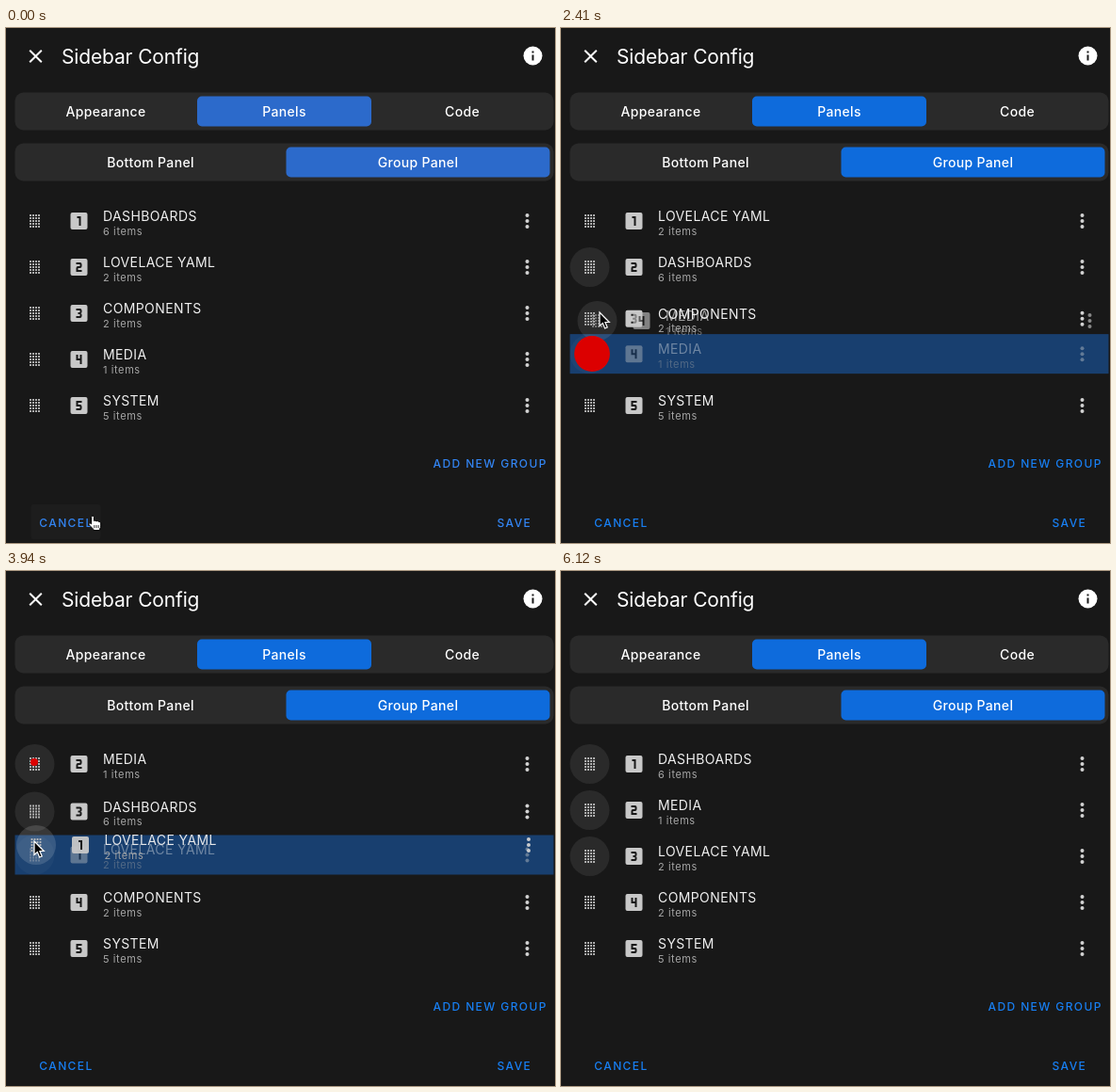
Animation, 583 px wide and 547 px high, one loop 7.65 s. Source, as an HTML page:

```html
<!DOCTYPE html>
<html lang="en">
<head>
<meta charset="utf-8">
<title>Sidebar Config</title>
<style>
  html, body { margin: 0; height: 100%; overflow: hidden; background: #181818; }
  svg { display: block; width: 583px; height: 547px; font-family: Inter, "Open Sans", sans-serif; --fill: #0e6bdc; --link: #187ff2; }
  svg.first { --fill: #2c6acb; --link: #3385f3; }
  .title { font-size: 21px; letter-spacing: -.15px; fill: #fff; }
  .tab { font-size: 14px; font-weight: 500; letter-spacing: .33px; text-anchor: middle; fill: #fff; }
  .link { font-size: 12px; font-weight: 500; letter-spacing: 1.4px; fill: var(--link); }
  .name { font-size: 14px; letter-spacing: .4px; fill: #f0f0f0; }
  .count { font-size: 11px; letter-spacing: .6px; fill: #a6a6a6; }
  .bar { fill: #2a2a2a; }
  .on { fill: var(--fill); }
</style>
</head>
<body>
<svg id="stage" viewBox="0 0 583 547">
  <rect width="583" height="547" fill="#181818"/>
  <path transform="translate(19.5 18)" fill="#fff" d="M19 6.41 17.59 5 12 10.59 6.41 5 5 6.41 10.59 12 5 17.59 6.41 19 12 13.41 17.59 19 19 17.59 13.41 12z"/>
  <text class="title" x="59" y="38">Sidebar Config</text>
  <circle cx="559.5" cy="29.5" r="10" fill="#fff"/>
  <path transform="translate(547.5 17.5)" fill="#181818" d="M13 9h-2V7h2zM13 17h-2v-6h2z"/>
  <rect class="bar" x="9.5" y="68.5" width="572" height="40" rx="9"/>
  <rect class="on" x="203" y="72.5" width="185" height="32" rx="5"/>
  <text class="tab" x="106" y="94">Appearance</text>
  <text class="tab" x="295.5" y="94">Panels</text>
  <text class="tab" x="484.5" y="94">Code</text>
  <rect class="bar" x="9.5" y="122.5" width="572" height="40" rx="9"/>
  <rect class="on" x="297.5" y="126.5" width="280" height="32" rx="5"/>
  <text class="tab" x="153.5" y="148">Bottom Panel</text>
  <text class="tab" x="437.5" y="148">Group Panel</text>
  <rect id="hover" x="26.5" y="506" width="74" height="37" rx="3" fill="#1d1d1d"/>
  <text class="link" x="453.5" y="466.5">ADD NEW GROUP</text>
  <text class="link" x="35.3" y="529.5">CANCEL</text>
  <text class="link" x="521.5" y="529.5">SAVE</text>
  <g id="live"></g>
</svg>
<script>
const LOOP = 7650, FPS = 17, SWAP = 150, SHRINK = 600;
const stage = document.getElementById('stage');
const hover = document.getElementById('hover');
const live = document.getElementById('live');

const items = [['DASHBOARDS', 6], ['LOVELACE YAML', 2], ['COMPONENTS', 2], ['MEDIA', 1], ['SYSTEM', 5]];
const digits = [
  'M14 17h-2V9h-2V7h4z',
  'M15 11a2 2 0 0 1-2 2h-2v2h4v2H9v-4a2 2 0 0 1 2-2h2V9H9V7h4a2 2 0 0 1 2 2z',
  'M15 10.5a1.5 1.5 0 0 1-1.5 1.5 1.5 1.5 0 0 1 1.5 1.5V15a2 2 0 0 1-2 2H9v-2h4v-2h-2v-2h2V9H9V7h4a2 2 0 0 1 2 2z',
  'M15 17h-2v-4H9V7h2v4h2V7h2z',
  'M15 9h-4v2h2a2 2 0 0 1 2 2v2a2 2 0 0 1-2 2H9v-2h4v-2H9V7h6z'
];

// Each drag: item, press and drop times, press point, grab point, direction, swap times
const drags = [
  { item: 0, at: 940, end: 1530, press: [32, 201], grab: [32, 201], dir: 1, swaps: [1200] },
  { item: 3, at: 2275, end: 2800, press: [33, 346], grab: [33, 343], dir: -1, swaps: [2378, 2600] },
  { item: 1, at: 3440, end: 4120, press: [30, 203], grab: [28.5, 201], dir: 1, swaps: [3600, 3808] },
  { item: 0, at: 4805, end: 5290, press: [28, 258], grab: [33, 259], dir: -1, swaps: [4950] }
];

// Pointer path: time, x, y
const path = [
  [0, 92, 518], [20, 92, 518], [530, 32, 201], [1000, 32, 201], [1350, 34, 254], [1500, 34, 256],
  [1650, 33, 275], [2200, 33, 346], [2275, 33, 346], [2412, 41, 302], [2470, 38, 284], [2700, 32, 250],
  [3000, 30, 246], [3118, 30, 246], [3176, 27, 222], [3380, 30, 203], [3460, 30, 203], [3941, 30, 287],
  [4240, 32, 291], [4410, 32, 291], [4750, 28, 258], [4820, 28, 258], [5120, 36, 214], [5235, 37, 212],
  [5400, 37, 212], [5941, 41, 519], [6115, 220, 550]
];
const arrowTimes = [[100, 480], [3160, 3330], [5450, 5900], [5990, 6115]];

const clamp = v => Math.max(0, Math.min(1, v));
const ease = v => (1 - Math.cos(Math.PI * clamp(v))) / 2;

function pointer(t) {
  const i = path.findIndex(p => p[0] > t);
  const [t0, x0, y0] = path[i - 1], [t1, x1, y1] = path[i];
  const e = ease((t - t0) / (t1 - t0));
  return [x0 + (x1 - x0) * e, y0 + (y1 - y0) * e];
}

function listState(t) {
  const order = [0, 1, 2, 3, 4], pos = [...order], num = [...order], touched = new Set();
  for (const d of drags) {
    if (t >= d.at) touched.add(d.item);
    for (const s of d.swaps) {
      if (t < s) continue;
      const i = order.indexOf(d.item), j = i + d.dir, other = order[j], e = ease((t - s) / SWAP);
      order[i] = other;
      order[j] = d.item;
      pos[d.item] = i + d.dir * e;
      pos[other] = j - d.dir * e;
    }
    if (t >= d.end) order.forEach((item, slot) => num[item] = slot);
  }
  return { pos, num, touched };
}

let grip = '';
for (let r = 0; r < 5; r++)
  for (let c = 0; c < 4; c++)
    grip += `M${25.1 + c * 3} ${-6.9 + r * 3}h1.8v1.8h-1.8z`;
const dots = [-6, 0, 6].map(y => `<circle cx="553.5" cy="${y}" r="2" fill="#d2d2d2"/>`).join('');

function row(item, num, x, y, glow, opacity = 1) {
  const [name, count] = items[item];
  return `<g transform="translate(${x} ${y})" opacity="${opacity}">
    <circle cx="30.5" r="21" fill="#fff" fill-opacity="${glow}"/>
    <path d="${grip}" fill="#bdbdbd"/>
    <rect x="68.5" y="-9" width="18" height="18" rx="2" fill="#c8c8c8"/>
    <path transform="translate(65.5 -12)" d="${digits[num]}" fill="#181818"/>
    <text class="name" x="103" y="0">${name}</text>
    <text class="count" x="103" y="14.5">${count} items</text>${dots}</g>`;
}

const arrow = '<path d="M0 0V14.5L3.3 11.5 5.6 17 8.2 16 5.9 10.5H10.3Z" fill="#000" stroke="#fff" stroke-width="1.2"/>';
const hand = `<path d="M-1.5 1.6a1.5 1.5 0 0 1 3 0V5.4q1.5-.8 2.6.4 1.5-.7 2.4.6 2-.2 2.2 1.4V11q0 1.6-1 2.8V15.6H.8V14.4L-3.8 9.7q-.8-1.7.8-2.1L-1.5 8.8Z" fill="#fff" stroke="#000"/>
  <path d="M1.8 10v3.2M4 10v3.2M6.2 10v3.2" stroke="#000" stroke-width=".8"/>`;

function draw(t) {
  const { pos, num, touched } = listState(t);
  const shown = t < 6115;
  const [x, y] = shown ? pointer(t) : [0, 0];
  const drag = drags.find(d => t > d.at + 50 && t < d.end);
  const rowY = item => 205 + 49 * pos[item];
  let out = '';

  items.forEach((_, i) => {
    if (!drag || drag.item !== i) out += row(i, num[i], 0, rowY(i), touched.has(i) ? .08 : 0);
  });
  if (drag) {
    const { item, grab, dir, swaps } = drag, ry = rowY(item);
    const home = 205 + 49 * (pos[item] - dir * swaps.reduce((n, s) => n + ease((t - s) / SWAP), 0));
    out += `<rect x="9.5" y="${ry - 21}" width="572" height="42" fill="#183f6f"/>`;
    out += row(item, num[item], 0, ry, .08, .4);
    out += row(item, num[item], x - grab[0], home + y - grab[1], .15, Math.min(.95, .45 + (t - drag.at) / 900));
  }
  for (const { at, press: [px, py] } of drags) {
    const left = 1 - (t - at) / SHRINK;
    if (t >= at && left > 0) out += `<circle cx="${px}" cy="${py}" r="${24.5 * left}" fill="#dc0000"/>`;
  }
  if (shown) {
    const isArrow = drag && t < drag.end - 80 || arrowTimes.some(([a, b]) => t > a && t < b);
    const scale = t > 3170 ? 1 + .9 * clamp((3416 - t) / 240) : 1;
    out += `<g transform="translate(${x} ${y}) scale(${scale})">${isArrow ? arrow : hand}</g>`;
  }
  live.innerHTML = out;
  stage.classList.toggle('first', t < 50);
  hover.style.display = t < 100 ? '' : 'none';
}

let last = -1;
const start = performance.now();
function tick(now) {
  const step = Math.floor(Math.max(0, now - start) % LOOP * FPS / 1000 + .1);
  if (step !== last) draw((last = step) * 1000 / FPS);
  requestAnimationFrame(tick);
}
tick(start);
</script>
</body>
</html>
```
